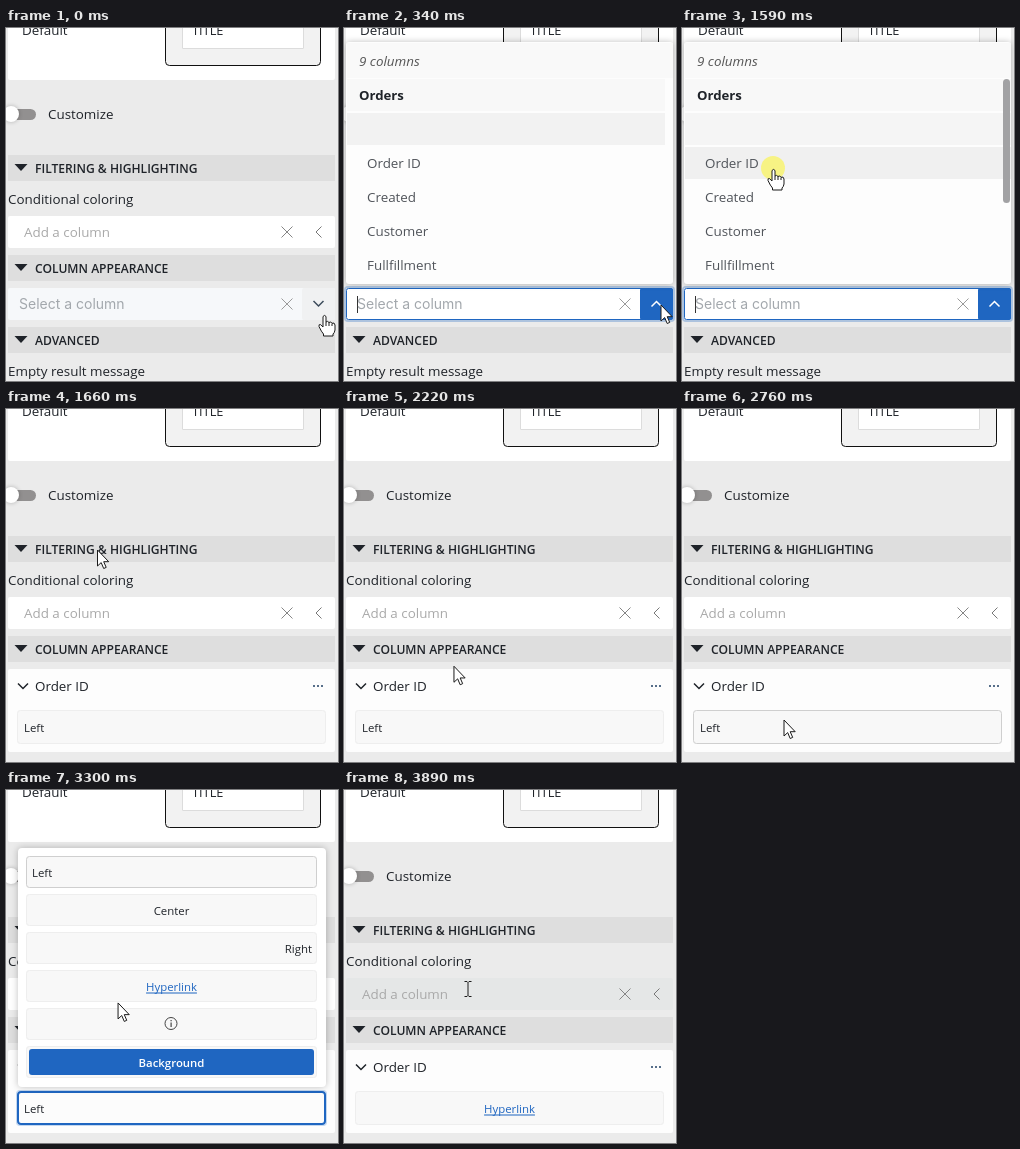
An HTML page with a canvas for the animation above (4.49 s loop, 332x353 px).

```html
<!DOCTYPE html>
<html lang="en">
<head>
<meta charset="utf-8">
<title>Column appearance settings</title>
<style>
  html, body { margin: 0; width: 100%; height: 100%; overflow: hidden; background: #ebebeb; }
  canvas { display: block; width: 332px; height: 353px; }
</style>
</head>
<body>
<canvas id="stage"></canvas>
<script>
const W = 332, H = 353, LOOP = 4490;
const stage = document.getElementById('stage');
const ctx = stage.getContext('2d');
const ratio = window.devicePixelRatio || 1;
stage.width = W * ratio;
stage.height = H * ratio;

const INK = '#1f2329', MUTED = '#a9a9a9', BLUE = '#1f66c1', PAGE = '#ebebeb';
const BODY = '13.4px "Open Sans", "Noto Sans", sans-serif';
const SMALL = '11.4px "Open Sans", "Noto Sans", sans-serif';
const HEADING = '600 12.1px "Open Sans", "Noto Sans", sans-serif';
const FIELD = '14px Inter, sans-serif';

// State changes, in ms
const PRESS = 70, LIST_OPEN = 270, SCROLLBAR = 610, PICK = 1520, LIST_CLOSE = 1660;
const BOX_HOVER = 2380, MENU_OPEN = 2890, LINK_HOVER = 3430, LINK_HAND = 3570;
const MENU_CLOSE = 3830, ROW_HOVER = 3890;

// Pointer route: time, x, y
const ROUTE = [
  [0, 318.5, 287], [200, 318.5, 287], [270, 317, 277], [470, 317, 277], [540, 300, 240],
  [820, 190, 176], [1100, 104, 148], [1520, 91.5, 141], [1930, 91.5, 141], [2220, 110, 257],
  [2420, 103, 308], [2560, 102, 311], [2890, 102, 311], [2960, 104, 280],
  [3300, 112, 213], [3500, 124, 199]
];

const ARROW = new Path2D('M0 0V16L3.7 12.6 6.2 18.5 8.7 17.4 6.2 11.7H11.2Z');
const HAND = new Path2D('M-1.5 1.5Q0-.7 1.5 1.5V7Q3 5.5 4.5 7.5Q6.5 6 7.5 8.3Q10 7 10.5 10V15' +
  'Q10 18 8.5 19V21H-1V19Q-3 17-5.5 11.5Q-6 9-4 9.6L-1.5 12Z');
const KNUCKLES = new Path2D('M1.5 7V11M4.5 7.5V11M7.5 8.5V11');
const IBEAM = new Path2D('M-3.5-7.5H-1L0-6.5 1-7.5H3.5M0-6.5V6.5M-3.5 7.5H-1L0 6.5 1 7.5H3.5');

function text(string, x, y, font = BODY, color = INK, align = 'left') {
  ctx.font = font;
  ctx.fillStyle = color;
  ctx.textAlign = align;
  ctx.fillText(string, x, y);
}

function box(x, y, w, h, fill, { radius = 0, border, line = 1, shadow = 0 } = {}) {
  ctx.save();
  ctx.shadowColor = 'rgba(0,0,0,.25)';
  ctx.shadowBlur = shadow;
  ctx.fillStyle = fill;
  ctx.beginPath();
  ctx.roundRect(x, y, w, h, radius);
  ctx.fill();
  ctx.restore();
  if (!border) return;
  ctx.strokeStyle = border;
  ctx.lineWidth = line;
  ctx.beginPath();
  ctx.roundRect(x + line / 2, y + line / 2, w - line, h - line, radius);
  ctx.stroke();
}

function lines(points, color, width = 1) {
  ctx.strokeStyle = color;
  ctx.lineWidth = width;
  ctx.beginPath();
  points.forEach(([x, y], i) => i ? ctx.lineTo(x, y) : ctx.moveTo(x, y));
  ctx.stroke();
}

function disc(x, y, r, color) {
  ctx.fillStyle = color;
  ctx.beginPath();
  ctx.arc(x, y, r, 0, 7);
  ctx.fill();
}

function chevron(x, y, color, up = 1) {
  lines([[x - 5, y - 2.5 * up], [x, y + 2.5 * up], [x + 5, y - 2.5 * up]], color, 1.5);
}

function cross(x, y, color) {
  lines([[x - 5.5, y - 5.5], [x + 5.5, y + 5.5]], color);
  lines([[x + 5.5, y - 5.5], [x - 5.5, y + 5.5]], color);
}

function section(title, y) {
  box(2, y, 327, 26, '#dedede');
  ctx.fillStyle = INK;
  ctx.beginPath();
  ctx.moveTo(8.5, y + 9);
  ctx.lineTo(21.5, y + 9);
  ctx.lineTo(15, y + 16);
  ctx.fill();
  text(title, 29, y + 18, HEADING);
}

function drawPage(rowHover) {
  box(0, 0, W, H, PAGE);
  box(2, -5, 327, 57, '#fff', { radius: 2 });
  text('Default', 16, 7);
  box(159, -9, 156, 47, '#f2f2f2', { radius: 4, border: '#111' });
  box(176, -9, 122, 30, '#fff', { border: '#dcdcdc' });
  text('TITLE', 186, 7, '12.8px "Open Sans", "Noto Sans", sans-serif');

  box(-4, 81, 34, 11, '#929090', { radius: 5.5 });
  box(-3, 78, 16, 16, '#fff', { radius: 8, shadow: 4 });
  text('Customize', 42, 91);

  section('FILTERING & HIGHLIGHTING', 127);
  text('Conditional coloring', 2, 176);
  box(2, 188, 327, 32, rowHover ? '#e5e7e7' : '#fff', { radius: 2 });
  text('Add a column', 18, 209, BODY, MUTED);
  cross(281, 204, '#858585');
  lines([[315.5, 198.5], [310, 204], [315.5, 209.5]], '#777');
  section('COLUMN APPEARANCE', 227);
}

function drawSelect(open) {
  section('ADVANCED', 299);
  text('Empty result message', 2, 348);
  if (open) {
    box(0, 258, 331, 36, 'rgba(31,102,193,.3)', { radius: 4 });
    box(2, 260, 327, 32, '#fff', { radius: 2, border: BLUE });
    box(296, 260, 33, 32, BLUE, { radius: 2 });
    box(13, 268, 1, 17, '#333');
    chevron(312.5, 276, '#fff', -1);
  } else {
    box(2, 260, 327, 32, '#f6f8fa', { radius: 2 });
    box(296, 260, 33, 32, '#f0f1f2', { radius: 2 });
    chevron(312.5, 275.5, '#3c4b5b');
  }
  text('Select a column', 13, 281, FIELD, '#a3a8ad');
  cross(281, 276, '#9a9a9a');
}

function drawList(t, pointerY) {
  const hovered = t < 540 ? -1 : Math.floor((pointerY - 118) / 34);
  const scrollbar = t >= SCROLLBAR;
  const rowWidth = scrollbar ? 326 : 318;
  box(2, 14, 327, 242, '#fdfdfd', { radius: 3, shadow: 6 });
  box(3, 15, 326, 35, '#f9f9f9');
  text('9 columns', 15, 38, 'italic ' + BODY, '#555');
  box(3, 51, rowWidth, 32, '#f8f8f8');
  text('Orders', 15, 72, '700 13.2px "Open Sans", "Noto Sans", sans-serif');
  box(3, 85, rowWidth, 32, hovered < 0 ? '#f2f2f2' : '#f5f5f5');
  ['Order ID', 'Created', 'Customer', 'Fullfillment'].forEach((name, i) => {
    if (i === hovered) box(3, 119 + i * 34, rowWidth, 32, '#f0f0f0');
    text(name, 23, 140 + i * 34, BODY, '#50545a');
  });
  if (scrollbar) box(321, 51, 7, 124, '#a2a2a4', { radius: 3.5 });
}

function link(x, y) {
  text('Hyperlink', x, y, SMALL, BLUE, 'center');
  const half = ctx.measureText('Hyperlink').width / 2;
  box(x - half, y + 1.5, half * 2, 1, BLUE);
}

function drawPanel(t, open) {
  box(2, 260, 327, 83, '#fdfdfd', { radius: 2 });
  chevron(17, 277, INK);
  text('Order ID', 29, 282);
  [308, 312, 316].forEach(x => disc(x, 277, 1, '#1f3f63'));

  if (open) {
    box(10, 300, 311, 36, '#c3d7ef', { radius: 4 });
    box(11, 301, 309, 34, '#fcfcfc', { radius: 3, border: BLUE, line: 2 });
  } else {
    const hover = t >= BOX_HOVER && t < MENU_OPEN;
    box(11, 301, 309, 34, '#f8f8f8', { radius: 3, border: hover ? '#cfcfcf' : '#eeeeee' });
  }
  if (t < MENU_CLOSE) text('Left', 18, 323, SMALL);
  else link(165.5, 323);
}

function drawMenu(t) {
  box(12, 58, 308, 239, '#fff', { radius: 4, shadow: 7 });
  for (let i = 0; i < 6; i++) {
    const active = i === 0 || (i === 3 && t >= LINK_HOVER);
    box(20, 66 + i * 38, 291, 32, '#f8f8f8', { radius: 3, border: active ? '#cfcfcf' : '#eeeeee' });
  }
  text('Left', 26, 87, SMALL);
  text('Center', 165.5, 125, SMALL, INK, 'center');
  text('Right', 306, 163, SMALL, INK, 'right');
  link(165.5, 201);
  ctx.strokeStyle = '#444';
  ctx.lineWidth = 1;
  ctx.beginPath();
  ctx.arc(165, 233.5, 6, 0, 7);
  ctx.stroke();
  box(164.5, 232.5, 1.2, 4.5, '#444');
  box(164.5, 230, 1.2, 1.3, '#444');
  box(23, 259, 285, 26, BLUE, { radius: 3 });
  text('Background', 165.5, 277, '600 11.4px "Open Sans", "Noto Sans", sans-serif', '#fff', 'center');
}

function pointerAt(t) {
  const next = ROUTE.findIndex(stop => stop[0] > t);
  if (next < 0) return ROUTE[ROUTE.length - 1].slice(1);
  const [t0, x0, y0] = ROUTE[next - 1], [t1, x1, y1] = ROUTE[next];
  const k = (t - t0) / (t1 - t0);
  return [x0 + (x1 - x0) * k, y0 + (y1 - y0) * k];
}

function drawPointer(t, x, y) {
  const hand = t < LIST_OPEN || (t >= 540 && t < LIST_CLOSE) || (t >= LINK_HAND && t < MENU_CLOSE);
  const pressed = (t >= PRESS && t < 210) || (t >= PICK && t < LIST_CLOSE);
  if (pressed) disc(x - 0.5, y - 1, 12, 'rgba(250,244,90,.72)');
  ctx.save();
  ctx.translate(x, y);
  ctx.strokeStyle = '#1a1a1a';
  ctx.fillStyle = '#fff';
  ctx.lineWidth = 1;
  if (t >= MENU_CLOSE) {
    ctx.stroke(IBEAM);
  } else {
    const shape = hand ? HAND : ARROW;
    ctx.fill(shape);
    ctx.stroke(shape);
    if (hand) ctx.stroke(KNUCKLES);
  }
  ctx.restore();
}

function draw(t) {
  const [x, y] = pointerAt(t);
  const listOpen = t >= LIST_OPEN && t < LIST_CLOSE;
  const menuOpen = t >= MENU_OPEN && t < MENU_CLOSE;
  ctx.setTransform(ratio, 0, 0, ratio, 0, 0);
  drawPage(t >= ROW_HOVER);
  if (t < LIST_CLOSE) drawSelect(listOpen);
  else drawPanel(t, menuOpen);
  if (listOpen) drawList(t, y);
  if (menuOpen) drawMenu(t);
  drawPointer(t, x, y);
}

function tick() {
  draw(performance.now() % LOOP);
  requestAnimationFrame(tick);
}
tick();
</script>
</body>
</html>
```
